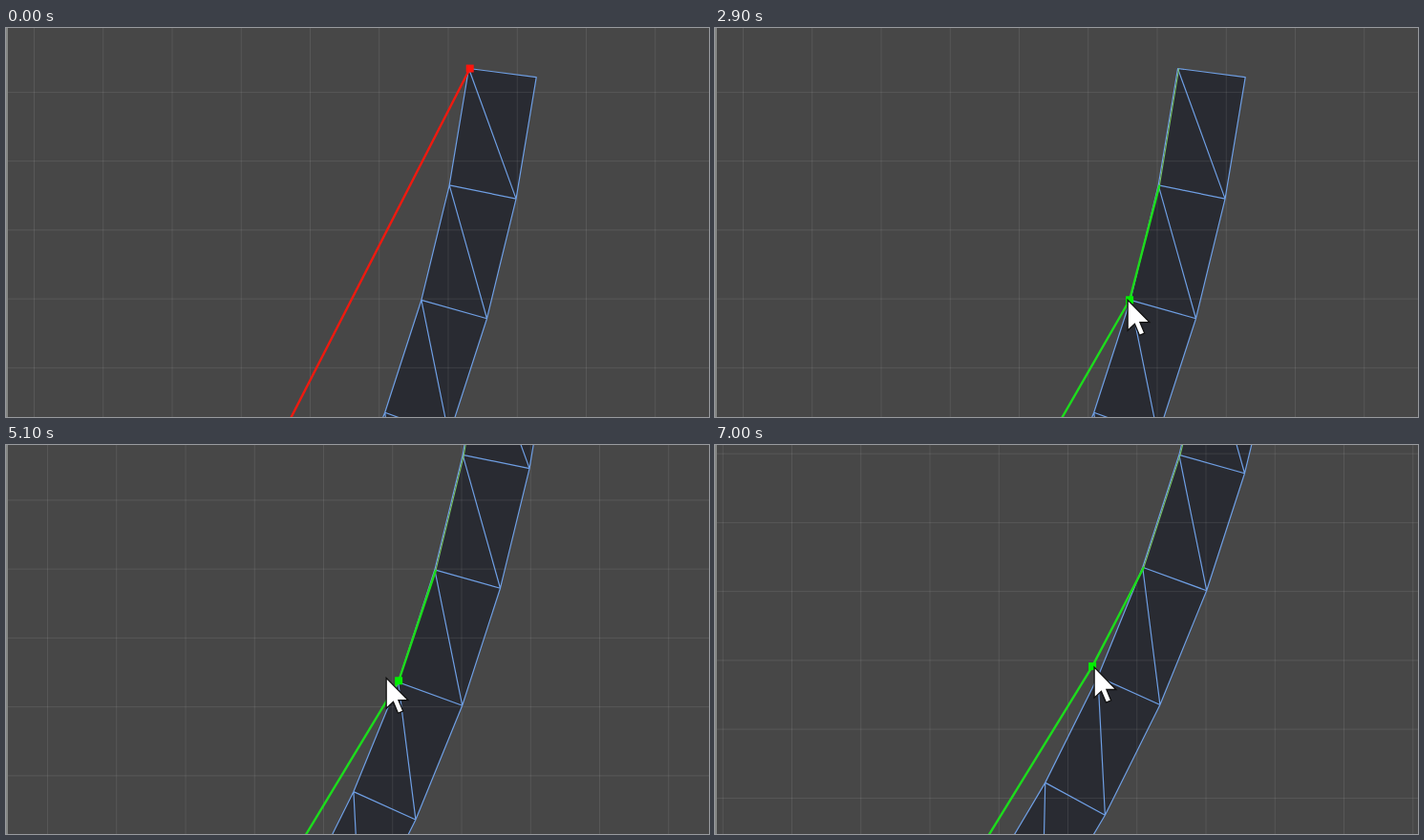
These frames come from a looping animation (736 px wide and 408 px high, 7100 ms). An HTML page:

```html
<!DOCTYPE html>
<html>
<head>
<meta charset="utf-8">
<title>Edge collider editing</title>
<style>
html, body { margin: 0; width: 100%; height: 100%; overflow: hidden; background: #474747; }
svg { display: block; width: 736px; height: 408px; }
</style>
</head>
<body>
<svg viewBox="0 0 736 408" fill="none">
  <rect width="736" height="408" fill="#474747"/>
  <path id="body" fill="#292b32"/>
  <path id="grid" stroke="#fff" stroke-opacity=".09"/>
  <rect width="2" height="408" fill="#858785"/>
  <g id="world">
    <path id="mesh" stroke="#6f9fe4" stroke-width="1.2" stroke-linejoin="round"/>
    <path id="thin" stroke="#78c064" stroke-width="1.1"/>
    <path id="thick" stroke-width="2.4" stroke-linejoin="round"/>
    <rect id="handle" width="8" height="8"/>
  </g>
  <path id="arrow" d="M0 0V32L7.3 25.2L12.3 37L17.6 34.8L12.8 23.4H22.8Z" fill="#fff" stroke="#111" stroke-width="1.3"/>
  <g id="hand" stroke-linecap="round" stroke-linejoin="round">
    <path id="rim" stroke="#1a1a1a" stroke-width="5"/>
    <path id="fingers" stroke="#fff" stroke-width="3"/>
    <path d="M-5 0H6.5L6 5L4 9.5H-3L-6 5Z" fill="#fff"/>
  </g>
</svg>
<script>
const LOOP = 7100, STEP = 100, CELL = 72.25;
const HOVER = 300, DRAG = 700, RED_UNTIL = 300;

const $ = id => document.getElementById(id);
const add = ([a, b], [c, d]) => [a + c, b + d];
const line = pts => pts.length ? 'M' + pts.map(p => p.join(' ')).join('L') : '';
const show = on => on ? 'visible' : 'hidden';
const set = (id, attrs) => {
  for (const k in attrs) $(id).setAttribute(k, attrs[k]);
};
const move = (id, [x, y]) => set(id, { transform: `translate(${x} ${y})` });

// The strip is a ring segment, cut at equal angles
const RADIUS = 1672, WIDTH = 71.3, rad = Math.PI / 180;
const polar = (deg, r) => [r * Math.cos(deg * rad), r * Math.sin(deg * rad)];
const START = 7.3, TURN = 4.25;
const center = add([484.5, 42.5], polar(START + 180, RADIUS));
const arc = r => Array.from({ length: 7 }, (_, i) => add(center, polar(START + TURN * i, r)));
const left = arc(RADIUS), right = arc(RADIUS + WIDTH);

// Collider ends on the strip's left corners, plus one far point
const anchors = left.map(p => add(p, [1.2, 0]));
const far = [-238, 1457];

// Each stage: the pointer rests (the view pans if the rest lasts), grabs the
// last collider edge at height y, then drags it to the next corner.
// tip is the pointer's offset from the handle.
const stages = [
  { from: 0, to: 0, rest: [745, 40], drag: 900, y: 136, tip: [-2, 2] },
  { from: 1800, to: 1800, rest: [456, 187], drag: 2300, y: 284, tip: [-2, 0] },
  { from: 3300, to: 3900, rest: [400, 350], drag: 4500, y: 376, tip: [-13, -3] },
  { from: 5700, to: 6300, rest: [376, 502], drag: 6700, y: 500, tip: [2, 1] }
];

// Keys are [time, point]
const panKeys = [
  [3300, [0, 0]], [3900, [14, -154.5]], [5700, [14, -154.5]], [5900, [29, -230]], [6300, [51, -275]]
];
const handleKeys = [], cursorKeys = [];

stages.forEach(({ from, to, rest, drag, y, tip }, i) => {
  const [x0, y0] = anchors[i], end = anchors[i + 1];
  const grab = [x0 + (far[0] - x0) * (y - y0) / (far[1] - y0), y];
  const stroke = [[drag - HOVER, grab], [drag, grab], [drag + DRAG, end]];
  handleKeys.push([to, anchors[i]], ...stroke);
  cursorKeys.push([from, rest], [to, rest], ...stroke.map(([t, p]) => [t, add(p, tip)]));
});

function at(keys, t) {
  const i = keys.findIndex(k => k[0] > t);
  if (i <= 0) return keys[i ? keys.length - 1 : 0][1];
  const [t0, a] = keys[i - 1], [t1, b] = keys[i];
  const u = (t - t0) / (t1 - t0), e = u * u * (3 - 2 * u);
  return a.map((v, j) => v + (b[j] - v) * e);
}

function draw(t) {
  const pan = at(panKeys, t);
  const panning = stages.some(s => s.to > s.from && t >= s.from && t <= s.to);
  const placed = stages.filter(s => t >= s.drag);
  const active = Math.max(0, stages.filter(s => t > s.to).length - 1);
  const red = t < RED_UNTIL;
  const pts = [
    anchors[0],
    ...placed.map(s => at(handleKeys, Math.min(t, s.drag + DRAG))),
    far
  ];
  const [hx, hy] = at(handleKeys, t);

  for (const id of ['world', 'body']) move(id, pan);
  move('grid', pan.map(v => Math.round(v) % CELL));
  set('thin', { d: line(pts) });
  set('thick', { d: panning ? '' : line(pts.slice(active)), stroke: red ? '#ef190f' : '#1cdc1c' });
  set('handle', { x: hx - 4, y: hy - 4, fill: red ? '#ff140c' : '#00f000', visibility: show(!panning) });
  for (const id of ['arrow', 'hand']) {
    move(id, add(at(cursorKeys, t), pan));
    set(id, { visibility: show((id === 'hand') === panning) });
  }
}

function build() {
  let grid = '';
  for (let i = -1; i < 12; i++) {
    grid += `M${29.5 + i * CELL} -80V490M-80 ${67.4 + i * CELL}H820`;
  }
  set('grid', { d: grid });

  const outline = line([...left, ...right.slice().reverse()]) + 'Z';
  const inner = left.map((p, i) => line([right[i], p, right[i + 1] || p])).join('');
  set('body', { d: outline });
  set('mesh', { d: outline + inner });

  const fingers = 'M-4 1L-5 -6M-1 0L-1.5 -8.5M2.2 0L2.6 -8M5 1L6.4 -5M-3 6L-7 1M-3 7H4';
  for (const id of ['rim', 'fingers']) set(id, { d: fingers });
}

function tick() {
  const t = performance.now() % LOOP;
  draw(Math.floor(t / STEP) * STEP);
  requestAnimationFrame(tick);
}

build();
tick();
</script>
</body>
</html>
```
